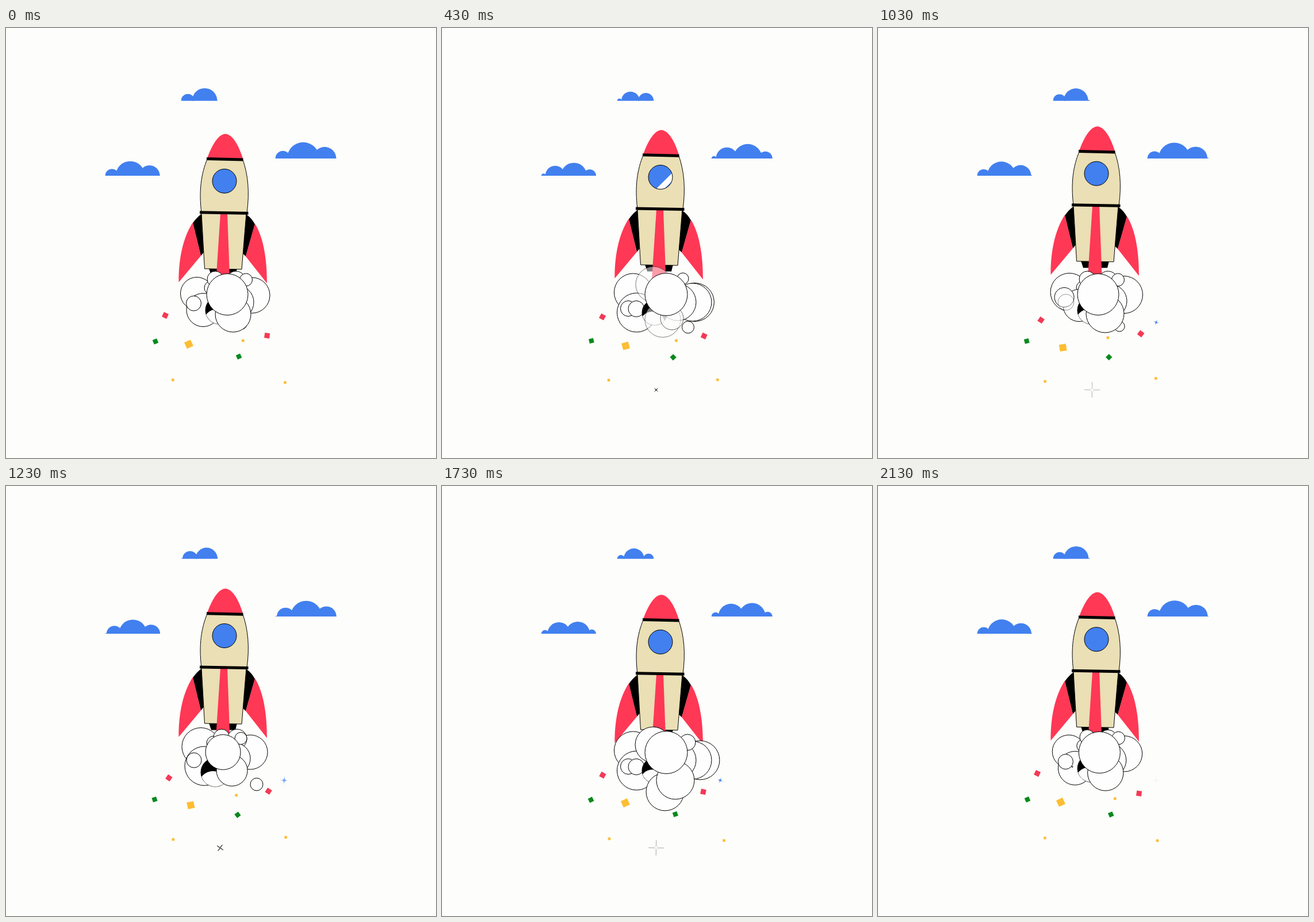
Write an HTML page with a canvas that moves like this. It is 748 by 748 pixels and loops after 2160 ms.

```html
<!DOCTYPE html>
<html lang="en">
<head>
<meta charset="utf-8">
<title>Rocket</title>
<style>
  html, body { margin: 0; width: 100%; height: 100%; overflow: hidden; background: #fdfdfb; }
  canvas { display: block; }
</style>
</head>
<body>
<canvas id="stage" width="748" height="748"></canvas>
<script>
const ctx = document.getElementById('stage').getContext('2d');
const LOOP = 2160;
const RED = '#ff3855', BLUE = '#4280ef', CREAM = '#eadfb5', WHITE = '#fefefe', BLACK = '#000';
const GREEN = '#08891d', YELLOW = '#fdbd33', CRIMSON = '#f23a55';

const mix = (a, b, k) => a + (b - a) * k;

function shape(path, fill, stroke) {
  const p = new Path2D(path);
  if (fill) { ctx.fillStyle = fill; ctx.fill(p); }
  if (stroke) { ctx.strokeStyle = BLACK; ctx.lineWidth = stroke; ctx.stroke(p); }
}

function disc(x, y, r, fill, stroke) {
  ctx.beginPath();
  ctx.arc(x, y, Math.max(r, 0), 0, 7);
  ctx.fillStyle = fill;
  ctx.fill();
  if (stroke) { ctx.strokeStyle = BLACK; ctx.lineWidth = stroke; ctx.stroke(); }
}

// Clouds: bumps [age, x, radius] are born on the left, swell, drift right and shrink
const LONG = [[0.1, 0.5, 0], [1, 12, 12], [2, 44, 25.5], [3, 77.5, 18], [4, 95.5, 0]];
const SHORT = [[0.1, 0.5, 0], [1, 12, 12], [2, 41.5, 22], [3, 64, 0]];

function cloud(x, y, scale, width, life, t) {
  ctx.save();
  ctx.translate(x, y);
  ctx.scale(scale, scale);
  ctx.beginPath();
  ctx.rect(0, -40, width, 40);
  ctx.clip();
  ctx.fillStyle = BLUE;
  ctx.fillRect(0, -0.8, width, 1);
  for (let age = (t + LOOP - 15) / (LOOP / 2) % 1; age < life.length; age++) {
    const i = life.findIndex(key => key[0] > age);
    if (i < 1) continue;
    const [t0, x0, r0] = life[i - 1], [t1, x1, r1] = life[i];
    const k = (age - t0) / (t1 - t0);
    disc(mix(x0, x1, k), 0, mix(r0, r1, k), BLUE);
  }
  ctx.restore();
}

// Key times shared by the rocket and the smoke
const TIMES = [0, 430, 730, 1030, 1230, 1730, LOOP];
const LIFT = [0.3, -6.5, -13.8, -12.8, -5.5, 5.3];

function segment(t) {
  let i = 0;
  while (t >= TIMES[i + 1]) i++;
  return [i, (t - TIMES[i]) / (TIMES[i + 1] - TIMES[i])];
}

function rocketY(t) {
  const n = LIFT.length;
  const at = i => LIFT[(i + n) % n];
  const time = i => TIMES[(i + n) % n] + Math.floor(i / n) * LOOP;
  const slope = i => (at(i + 1) - at(i - 1)) / (time(i + 1) - time(i - 1));
  const [i, k] = segment(t), span = time(i + 1) - time(i), q = 1 - k;
  return at(i) * (1 + 2 * k) * q * q + at(i + 1) * k * k * (3 - 2 * k)
    + span * k * q * (slope(i) * q - slope(i + 1) * k);
}

function rocket(t) {
  ctx.save();
  ctx.translate(0, rocketY(t));
  shape('M340 323Q331 330 325 339L339 396 344 390Z M418 324Q427 330 433 341L417 397 412 392Z', BLACK);
  shape('M325 338C307 365 300 405 300.5 442L339 396Z M433 340C449 366 454 405 454 444L417 397Z', RED);
  shape('M353 418H402L399 430H357Z', BLACK);
  shape('M340 322L345.5 418.5 410 419.5 418 322Z', CREAM, 1);
  shape('M373 322H385L389.5 444H365Z', RED);
  shape('M350 228C340 252 335 282 340 321L419 322C424 285 421 255 412 229Z', CREAM, 1);
  shape('M350 226C357 207 368 184.5 381.5 184C395 184.5 406 207 412 227Z', RED);
  shape('M349 227.3L412.5 228.8', null, 5);
  shape('M337 320.5L421.5 322', null, 5);

  ctx.translate(380, 266);
  disc(0, 0, 21, BLUE);
  ctx.save();
  ctx.clip();
  ctx.rotate(Math.PI / 4);
  ctx.fillStyle = WHITE;
  ctx.fillRect(9 + (t - 430) * 0.17, -30, 10, 60);
  ctx.restore();
  ctx.beginPath();
  ctx.arc(0, 0, 21, 0, 7);
  ctx.lineWidth = 1;
  ctx.strokeStyle = BLACK;
  ctx.stroke();
  ctx.restore();
}

// Smoke: each puff has [x, y, radius, opacity] per pose.
// E and F are variants of B and A; a pose that is still missing means the puff is gone.
const POSES = 'ABCFDEA';
const VARIANT = { E: 'B', F: 'A' };
const BACK = [
  { B: [440, 477, 33.5], E: [449, 477, 34] },
  { A: [428, 465, 31], B: [436, 477, 33], C: [433, 476, 29.5], D: [425, 463, 30], F: [428, 464, 32.5] },
  { A: [332, 462, 28.5], B: [332.5, 460, 33], C: [327, 465, 29], D: [339, 453.5, 33], F: [333, 459.5, 33] },
  { A: [357, 452, 12], D: [361, 447, 12] },
  { A: [364, 437, 14], C: [368, 435, 12], D: [375, 437, 14] },
  { A: [400, 440, 17], D: [402, 440, 17] },
  { A: [402, 477, 29], B: [410, 477, 32], C: [404, 487, 31], D: [398, 474, 27], F: [404, 475, 29] },
  { A: [343, 490.5, 29], B: [338.5, 495, 34], C: [342, 490, 29], D: [345, 487, 34], F: [350, 482.5, 28] },
  { A: [326.5, 479, 13], B: [324, 488, 13.5], C: [324, 488, 12], D: [327, 477, 13], F: [324, 468.5, 17] },
  { B: [338, 488.5, 14], F: [327, 477, 14, 0.4] },
  { A: [410, 515, 9], B: [428, 520.5, 10.5], D: [436, 519, 11], E: [428, 520, 0], F: [420, 519, 9] }
];
const SHADE = { A: [371, 491, 24], B: [370, 495, 22], D: [364, 498, 25] };
const FRONT = [
  { B: [368, 446, 31, 0.5], C: [358, 463, 35], E: [367, 450, 31] },
  { A: [388, 500, 0], B: [384, 507, 31, 0.5], C: [371, 512, 34], E: [388, 532, 33] },
  { A: [395, 498, 31], B: [400, 505, 20, 0.6], C: [404, 508, 27], D: [393, 495, 27], E: [406, 512, 33], F: [395, 497, 33] },
  { A: [417.5, 438, 11], B: [419, 436, 10], C: [418, 437.5, 10], D: [408.5, 439, 10.5], E: [427, 446, 14] },
  { A: [385, 463.5, 36], B: [390, 463.5, 37], C: [391, 463.5, 31.5], D: [377.5, 463, 30.5], F: [383, 463.5, 36] }
];

function blend(puff, t) {
  const [i, k] = segment(t);
  const pose = name => puff[name] || puff[VARIANT[name]];
  const from = pose(POSES[i]), to = pose(POSES[i + 1]);
  if (!from && !to) return [0, 0, 0, 0];
  const [x0, y0, r0, a0 = 1] = from || [to[0], to[1], 0];
  const [x1, y1, r1, a1 = 1] = to || [from[0], from[1], 0];
  return [mix(x0, x1, k), mix(y0, y1, k), mix(r0, r1, k), mix(a0, a1, k)];
}

function drawPuff(puff, t) {
  const [x, y, r, alpha] = blend(puff, t);
  if (r < 0.5) return;
  ctx.globalAlpha = alpha;
  disc(x, y, r, WHITE, 1);
  ctx.globalAlpha = 1;
}

function smoke(t) {
  BACK.forEach(puff => drawPuff(puff, t));
  const [x, y, r] = blend(SHADE, t);
  if (r > 0.5) {
    ctx.save();
    disc(x, y, r, BLACK, 1);
    ctx.clip();
    disc(x - 4, y + r * 0.9, r, WHITE, 1);
    ctx.restore();
  }
  FRONT.forEach(puff => drawPuff(puff, t));
}

// Confetti: colour, size, then [centre, swing, time of maximum] for x, y and angle
const CONFETTI = [
  [CRIMSON, 9, [280.3, 3.3, 1100], [504, 4.1, 1100], [30, 5, 1100]],
  [CRIMSON, 9, [455.6, 1.6, 930], [533.3, 2.7, 300], [22, 15, 930]],
  [GREEN, 8, [259.3, 0.8, 200], [545, 1, 1700], [-19, 8, 700]],
  [YELLOW, 12, [319.8, 1.9, 1020], [553, 3, 980], [-17, 9, 900]],
  [YELLOW, 4.5, [406, 6.2, 2130], [541.2, 3.3, 210], [10, 8, 600]],
  [GREEN, 8, [403.5, 2.5, 1850], [572, 1.1, 700], [-34, 16, 1850]],
  [YELLOW, 4.5, [290.5, 0.5, 1500], [613.5, 1.4, 1200], [-12, 8, 800]],
  [YELLOW, 4.5, [484.8, 6, 1660], [613.2, 4.2, 1950], [8, 10, 700]]
];

function confetti(t) {
  const swing = ([mid, amp, peak]) => mid + amp * Math.cos((t - peak) / LOOP * 2 * Math.PI);
  for (const [color, size, x, y, angle] of CONFETTI) {
    ctx.save();
    ctx.translate(swing(x), swing(y));
    ctx.rotate(swing(angle) * Math.PI / 180);
    ctx.fillStyle = color;
    ctx.fillRect(-size / 2, -size / 2, size, size);
    ctx.restore();
  }
}

// Each star twinkles twice: it unfolds while turning, then fades
function star(x, y, start, fill, stroke, t) {
  const k = (t - start) / 710 % 1;
  if (t < start || t >= start + 1420) return;
  const s = 14 * Math.sqrt(k);
  ctx.save();
  ctx.translate(x, y);
  ctx.rotate(50 * (1 - k) ** 1.6 * Math.PI / 180);
  ctx.globalAlpha = Math.min(1, (1 - k) / 0.4);
  ctx.lineJoin = 'round';
  shape(`M0 ${-s}C0 0 0 0 ${s} 0C0 0 0 0 0 ${s}C0 0 0 0 ${-s} 0C0 0 0 0 0 ${-s}Z`, fill, stroke);
  ctx.restore();
}

function draw(now) {
  const t = now % LOOP;
  ctx.fillStyle = '#fdfdfb';
  ctx.fillRect(0, 0, 748, 748);
  cloud(304.5, 126.5, 1, 64, SHORT, t);
  cloud(172.5, 257, 1, 95.5, LONG, t);
  cloud(468.5, 227, 1.113, 95.5, LONG, t);
  confetti(t);
  star(372.5, 629.5, 380, WHITE, 0.8, t);
  star(484, 512, 725, BLUE, 0, t);
  rocket(t);
  smoke(t);
}

const begin = performance.now();
function tick() {
  draw(performance.now() - begin);
  requestAnimationFrame(tick);
}
tick();
</script>
</body>
</html>
```
